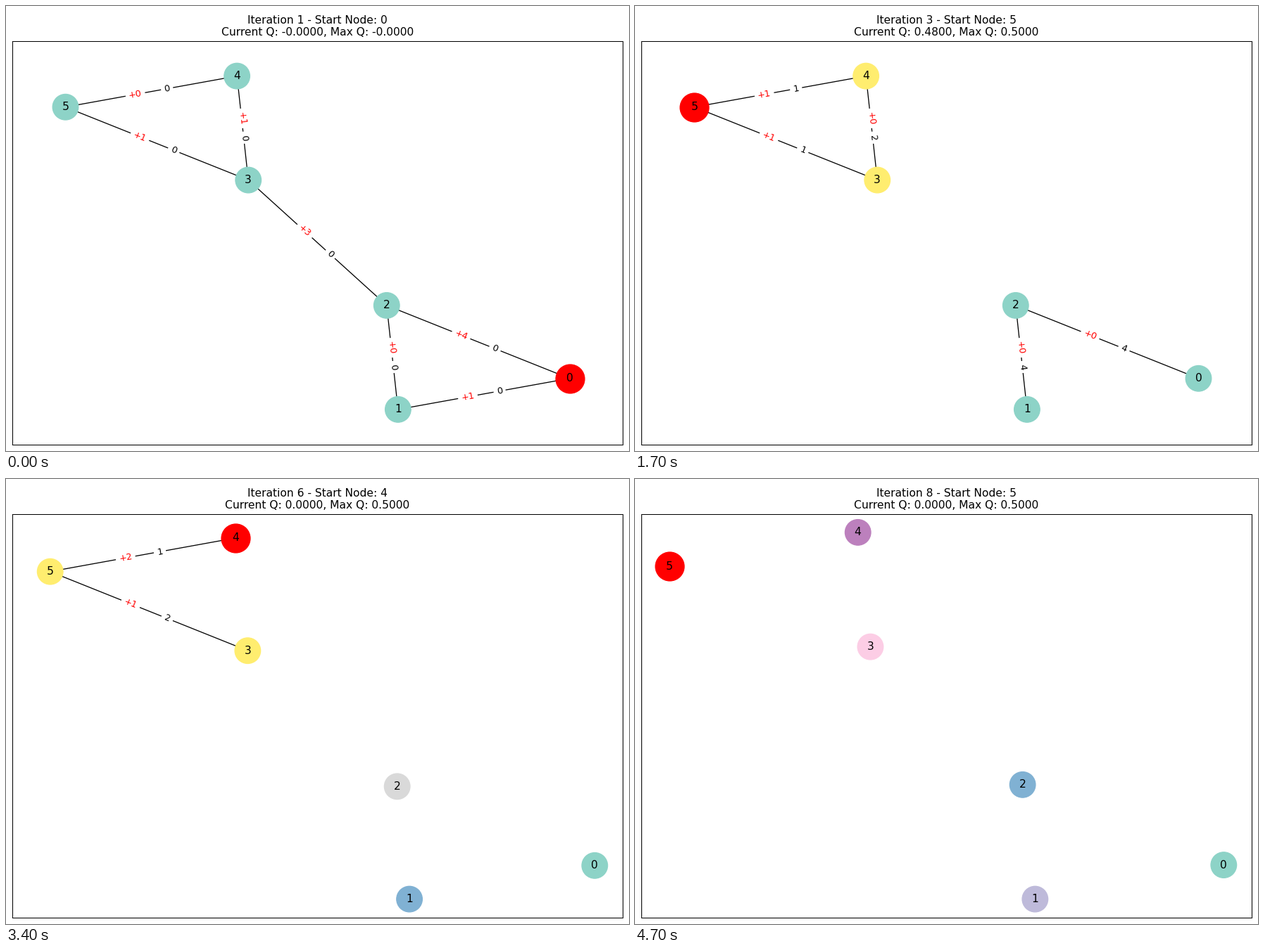
Recreate the animation shown at these times as a matplotlib script. Size 885 by 633 pixels, loop 4800 ms.

```python
import numpy as np
import matplotlib.pyplot as plt
from matplotlib.animation import FuncAnimation

W, H = 885, 633
DPI = W / 9.5
N = 6
POS = np.array([(1, -.814), (.3195, -1), (.2745, -.376),
                (-.2745, .376), (-.3195, 1), (-1, .814)])
EDGES = [(0, 1), (1, 2), (0, 2), (2, 3), (3, 4), (4, 5), (3, 5)]


def bfs(edges, start):
    """Visit order and parent of every node reachable from start."""
    order, parent = [start], {start: None}
    for node in order:
        for u, v in edges:
            if node in (u, v):
                other = v if node == u else u
                if other not in parent:
                    parent[other] = node
                    order.append(other)
    return order, parent


def edge_flow(edges, start):
    order, parent = bfs(edges, start)
    flow = dict.fromkeys(edges, 0)
    load = dict.fromkeys(order, 1)
    for node in reversed(order[1:]):
        up = parent[node]
        flow[min(node, up), max(node, up)] += load[node]
        load[up] += load[node]
    return flow


def communities(edges):
    groups = []
    for node in range(N):
        if not any(node in g for g in groups):
            groups.append(bfs(edges, node)[0])
    return groups


def modularity(edges, groups):
    m = len(edges)
    if m == 0:
        return 0.0
    if len(groups) == 1:
        return -0.0
    q = 0.0
    for g in groups:
        inner = sum(u in g for u, v in edges)
        q += inner / m - (inner / m) ** 2
    return abs(q)


def view_limits(edges):
    """Node bounds joined with the padded edge bounds, plus a 5% margin."""
    lo, hi = POS.min(0), POS.max(0)
    if edges:
        ends = POS[np.ravel(edges)]
        a, b = ends.min(0), ends.max(0)
        pad = .05 * (b - a)
        lo, hi = np.minimum(lo, a - pad), np.maximum(hi, b + pad)
    margin = .05 * (hi - lo)
    return lo - margin, hi + margin


def girvan_newman():
    """One state per drawn step: every start node of every iteration."""
    edges, best, states = list(EDGES), -np.inf, []
    for step in range(len(EDGES) + 1):
        groups = communities(edges)
        q = modularity(edges, groups)
        best = max(best, q)
        total = dict.fromkeys(edges, 0)
        for start in range(N):
            flow = edge_flow(edges, start)
            states.append((step + 1, start, q, best, list(edges), groups,
                           flow, dict(total)))
            for e in edges:
                total[e] += flow[e]
        if edges:
            edges.remove(max(edges, key=total.get))
    return states


STATES = girvan_newman()

plt.rcParams["font.family"] = "DejaVu Sans"
fig = plt.figure(figsize=((W + .01) / DPI, (H + .01) / DPI), dpi=DPI,
                 facecolor="white")
# Axes of 9.3 x 6.16 inches, 0.1 inch from the left and bottom.
ax = fig.add_axes([.1 * DPI / W, .1 * DPI / H, 9.3 * DPI / W, 6.16 * DPI / H])


def edge_label(edge, t, text, color):
    u, v = POS[edge[0]], POS[edge[1]]
    x, y = t * u + (1 - t) * v
    dx, dy = ax.transData.transform(v) - ax.transData.transform(u)
    angle = (np.degrees(np.arctan2(dy, dx)) + 90) % 180 - 90
    ax.text(x, y, text, color=color, size=10, ha="center", va="center",
            rotation=angle, zorder=1.5,
            bbox=dict(boxstyle="round", ec="white", fc="white"))


def draw(i):
    step, start, q, best, edges, groups, flow, total = STATES[i]
    ax.clear()
    ax.set(xticks=[], yticks=[])
    lo, hi = view_limits(edges)
    ax.set_xlim(lo[0], hi[0])
    ax.set_ylim(lo[1], hi[1])

    for e in edges:
        ax.plot(*POS[list(e)].T, color="black", lw=1, zorder=1)
    for e in edges:
        edge_label(e, .592, str(total[e]), "black")
    for e in edges:
        edge_label(e, .407, f"+{flow[e]}", "red")

    colors = np.zeros((N, 4))
    for k, group in enumerate(groups):
        colors[group] = plt.cm.Set3(k / max(len(groups) - 1, 1))
    # Per-node colour and size keep the circles at sub-pixel positions.
    ax.scatter(*POS.T, s=np.full(N, 800), c=colors, lw=1, zorder=2)
    ax.scatter(*POS[start], s=1000, color="red", lw=1, zorder=2.5)
    for node, (x, y) in enumerate(POS):
        ax.text(x, y, str(node), size=12, ha="center", va="center", zorder=3)

    ax.set_title(f"Iteration {step} - Start Node: {start}\n"
                 f"Current Q: {q:.4f}, Max Q: {best:.4f}", fontsize=12)
    return []


anim = FuncAnimation(fig, draw, frames=len(STATES), interval=100,
                     repeat=True, repeat_delay=0)
plt.show()
```
